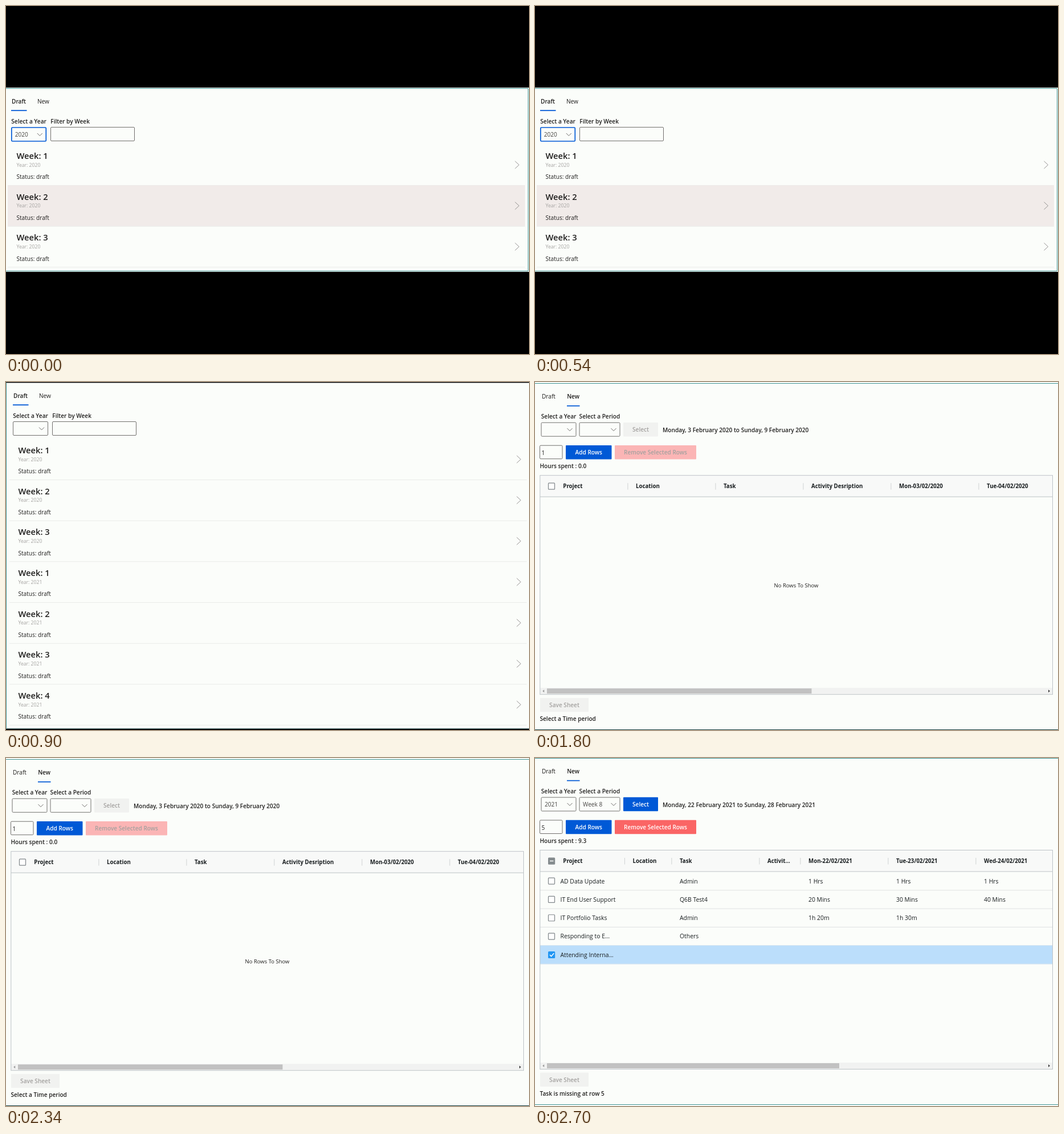
Animation, 918 px wide and 610 px high, one loop 3.6 s. Source, as an HTML page:

```html
<!DOCTYPE html>
<html lang="en">
<head>
<meta charset="utf-8">
<title>Timesheet</title>
<style>
  html, body { margin: 0; width: 100%; height: 100%; overflow: hidden; background: #000; }
  svg { display: block; width: 918px; height: 610px; }
  text { font: 10.1px "Open Sans", "Noto Sans", sans-serif; fill: #201f1e; white-space: pre; }
  .bold { font-weight: 600; }
  .title { font-size: 14.7px; font-weight: 600; }
  .small { font-size: 8.65px; fill: #a5a3a1; }
  .head { font-size: 9.7px; font-weight: 700; fill: #181d1f; }
  .cell { font-size: 10.4px; fill: #181d1f; }
  .note { font-size: 9.5px; }
  .mid { text-anchor: middle; }
</style>
</head>
<body>
<svg id="stage" viewBox="0 0 918 610"></svg>
<script>
const PAPER = '#fbfdfa', BLUE = '#0059d6', TEAL = '#3f9494', GREY = '#72706e', DISABLED = '#a3a19f';
const LOOP = 3600;

const rect = (x, y, w, h, fill, extra = '') =>
  `<rect x="${x}" y="${y}" width="${w}" height="${h}" fill="${fill}" ${extra}/>`;
const box = (x, y, w, h, color = GREY, weight = 1) =>
  rect(x, y, w, h, 'none', `rx="1.5" stroke="${color}" stroke-width="${weight}"`);
const path = (d, color) => `<path d="${d}" fill="none" stroke="${color}"/>`;
const text = (x, y, str, cls = '', color = '') =>
  `<text x="${x}" y="${y}" class="${cls}" ${color && `style="fill:${color}"`}>${str}</text>`;
const shift = (x, y, content) => `<g transform="translate(${x} ${y})">${content}</g>`;

const select = (x, y, w, value, color, weight) =>
  box(x, y, w, 24, color, weight) + text(x + 6, y + 15.5, value, '', '#454341') +
  path(`M${x + w - 15.5} ${y + 10}l4.5 4.5 4.5-4.5`, '#6f6d6b');

const button = (x, y, w, label, fill, color = '#fff') =>
  rect(x, y, w, 24.5, fill, 'rx="1"') + text(x + w / 2, y + 16.2, label, 'bold mid', color);

function draftList(weeks, year, hovered) {
  const rows = weeks.map(([week, weekYear], i) => {
    const y = i * 71.67;
    return (i === hovered ? rect(6, 99.8 + y, 908, 71.7, '#f1ebe9') : '') +
      rect(6, 171 + y, 908, 1, '#eaebe9') +
      text(21.5, 125 + y, `Week: ${week}`, 'title') +
      text(21.5, 138.8 + y, `Year: ${weekYear}`, 'small') +
      text(21.5, 160.3 + y, 'Status: draft') +
      path(`M896.5 ${129 + y}l7 6.5-7 6.5`, '#959391');
  }).join('');
  return text(13, 27.8, 'Draft', 'bold') + text(58, 27.8, 'New') + rect(12, 39.3, 27.5, 1.8, BLUE) +
    text(12.3, 62.5, 'Select a Year', 'bold') + text(81.3, 62.5, 'Filter by Week', 'bold') +
    (year ? select(12.8, 70, 60.5, year, BLUE, 1.7) : select(12.5, 69.5, 61, '')) +
    box(81.5, 69.5, 147, 24) + rows;
}

function checkbox(y, state) {
  if (!state) return rect(23.5, y - 5.5, 11, 11, '#fff', 'rx="1" stroke="#80868a" stroke-width="1.2"');
  const mark = state === 'checked' ? `M26 ${y}l2.5 2.7 4.7-5.4` : `M26 ${y}h6.4`;
  return rect(23, y - 6, 12.2, 12.2, state === 'checked' ? '#2196f3' : '#858b8e', 'rx="1.5"') +
    `<path d="${mark}" fill="none" stroke="#fff" stroke-width="1.5"/>`;
}

function newSheet(s) {
  const headers = s.columns.map(([x, label], i) =>
    (i ? rect(x - 14.6, 175, 1, 11.5, '#cfd2d3') : '') + text(x, 184.2, label, 'head')).join('');
  const rows = s.rows.map((cells, i) => {
    const y = 199.3 + i * 32.33, last = i === s.rows.length - 1;
    return (last ? rect(9, y, 899, 32.3, '#bbdefb') : '') +
      rect(9, y + 32, 899, 1, last ? '#d3e3ee' : '#dfe2e2') +
      checkbox(y + 16.3, last && 'checked') +
      cells.map((str, j) => text([44.5, 254, 480, 634, 788][j], y + 20.2, str, 'cell')).join('');
  }).join('');
  return text(12, 26.8, 'Draft') + text(56.2, 26.8, 'New', 'bold') + rect(56, 38.8, 22.5, 1.7, BLUE) +
    text(10.8, 61.7, 'Select a Year', 'bold') + text(77.6, 61.7, 'Select a Period', 'bold') +
    select(11, 69, 61, s.year) + select(78, 69, 71, s.period) +
    button(155, 68.7, 61, 'Select', ...(s.year ? [BLUE] : ['#f1f2f0', DISABLED])) +
    text(224, 86.2, s.range, 'bold') +
    box(8.5, 109, 39.5, 23.5) + text(11.5, 125.5, s.count) +
    button(54, 108.7, 80.5, 'Add Rows', BLUE) +
    button(140, 108.7, 143, 'Remove Selected Rows', ...(s.rows.length ? ['#fa6565'] : ['#fbb5b5', DISABLED])) +
    text(8.5, 148.7, `Hours spent : ${s.hours}`, 'bold') +
    rect(9, 162, 899, 37, '#f8f9f8') + rect(9, 198.5, 899, 1, '#bdc3c7') +
    checkbox(180.5, s.rows.length && 'mixed') + headers + rows +
    (s.rows.length ? '' : text(458.5, 357.5, 'No Rows To Show', 'note mid')) +
    rect(9, 534, 899, 11, '#f1f2f1') + rect(21, 535, s.thumb, 9, '#c1c1c1') +
    '<path d="M16.2 537v5l-3-2.5z" fill="#999"/><path d="M901 537v5l3-2.5z" fill="#404040"/>' +
    rect(8.8, 161.5, 899.7, 384, 'none', 'stroke="#bdc3c7"') +
    button(9, 551.5, 85, 'Save Sheet', '#f1f2f0', DISABLED) +
    text(8.5, 591.7, s.message, 'bold');
}

const draftWeeks = [1, 2, 3].map(w => [w, 2020]);
const allWeeks = draftWeeks.concat([1, 2, 3, 4].map(w => [w, 2021]));

const emptySheet = {
  year: '', period: '', count: 1, hours: '0.0', thumb: 464.5, rows: [],
  range: 'Monday, 3 February 2020 to Sunday, 9 February 2020',
  message: 'Select a Time period',
  columns: ['Project', 'Location', 'Task', 'Activity Desription', 'Mon-03/02/2020', 'Tue-04/02/2020']
    .map((label, i) => [i ? 23 + i * 154 : 49.3, label])
};

const filledSheet = {
  year: '2021', period: 'Week 8', count: 5, hours: '9.3', thumb: 513,
  range: 'Monday, 22 February 2021 to Sunday, 28 February 2021',
  message: 'Task is missing at row 5',
  columns: [[49.3, 'Project'], [171.5, 'Location'], [254, 'Task'], [408, 'Activit…'],
    [480, 'Mon-22/02/2021'], [634, 'Tue-23/02/2021'], [788, 'Wed-24/02/2021']],
  rows: [
    ['AD Data Update', 'Admin', '1 Hrs', '1 Hrs', '1 Hrs'],
    ['IT End User Support', 'Q6B Test4', '20 Mins', '30 Mins', '40 Mins'],
    ['IT Portfolio Tasks', 'Admin', '1h 20m', '1h 30m'],
    ['Responding to E…', 'Others'],
    ['Attending Interna…']
  ]
};

const scenes = [
  rect(0, 143, 918, 323, PAPER) + shift(-3, 143, draftList(draftWeeks, '2020', 1)) +
    path('M0 144.5H916.5V464.5H0', TEAL),
  rect(0, 1.4, 918, 606.6, PAPER) + draftList(allWeeks, '') +
    rect(0, 1.4, 1, 606, TEAL) + rect(0, 606.8, 918, 1.2, '#7d9c9c'),
  rect(0, 0, 918, 609, PAPER) + shift(0, 2.2, newSheet(emptySheet)) +
    rect(0, 2, 918, 1, TEAL) + rect(0, 609, 918, 1, '#123c3c'),
  rect(0, 0, 918, 610, PAPER) + newSheet(filledSheet) +
    rect(0, 0, 918, 1, TEAL) + rect(0, 607, 918, 1, TEAL)
];

const stage = document.getElementById('stage');
stage.innerHTML = rect(0, 0, 918, 610, '#000') + scenes.map(s => `<g class="scene">${s}</g>`).join('');
const groups = stage.querySelectorAll('.scene');
const start = performance.now();

function draw() {
  const current = Math.floor((performance.now() - start) % LOOP / (LOOP / scenes.length));
  groups.forEach((g, i) => g.style.display = i === current ? '' : 'none');
  requestAnimationFrame(draw);
}
draw();
</script>
</body>
</html>
```
